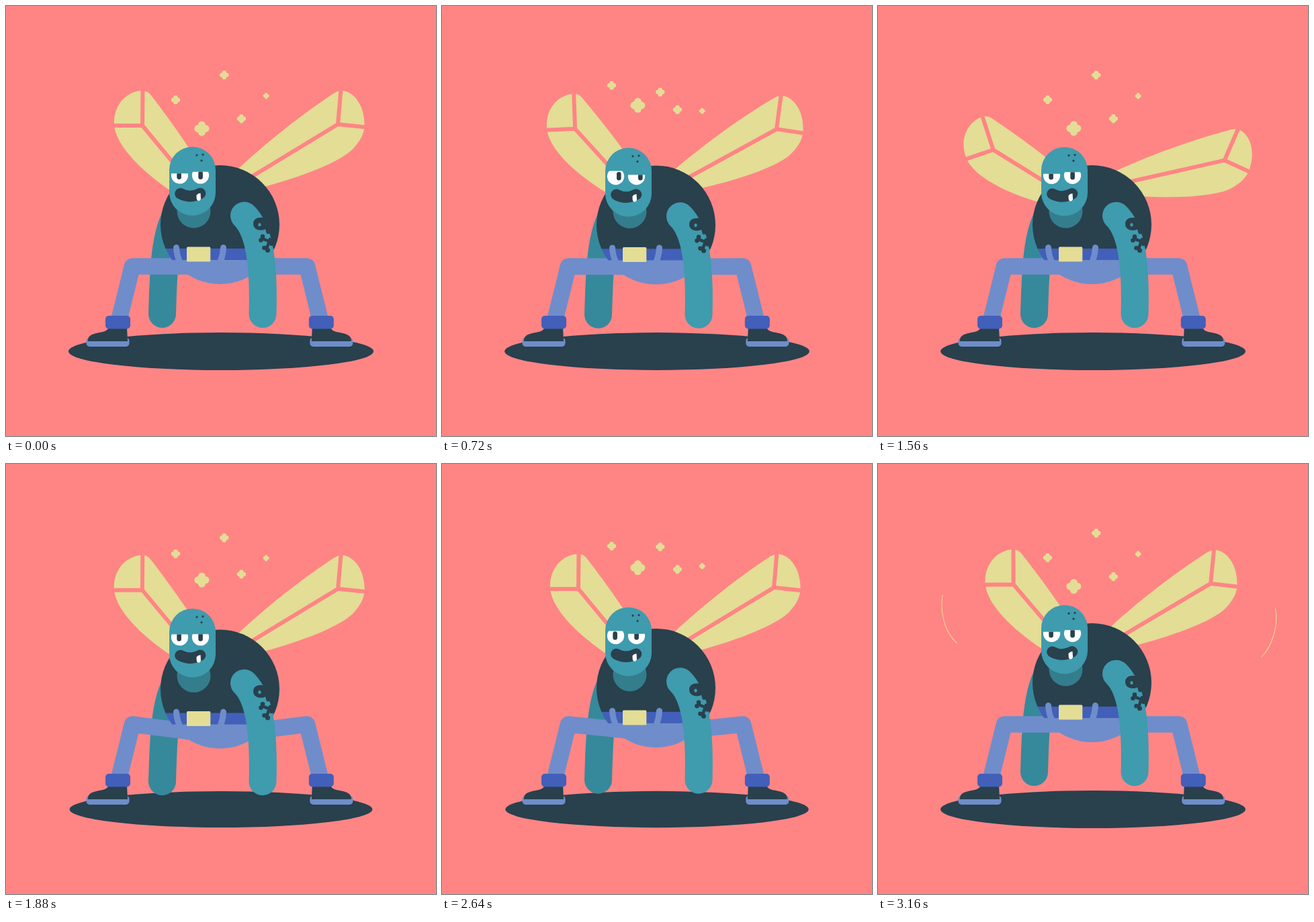
An HTML page that plays this animation: 640x640 px, repeating every 3200 ms.

```html
<!DOCTYPE html>
<html lang="en">
<head>
<meta charset="utf-8">
<title>Fly</title>
<style>
html, body { margin: 0; width: 100%; height: 100%; overflow: hidden; background: #ff8585; }
svg { display: block; width: 100vw; height: 100vh; }
.dark { fill: #29404d; }
.skin { fill: #3f9bae; }
.cloth { fill: #6f8dca; }
.denim { fill: #425fba; }
.pale { fill: #e3dd95; }
.line { fill: none; stroke-linecap: round; stroke-linejoin: round; }
.vein { fill: none; stroke: #ff8585; stroke-width: 6; }
.whoosh { fill: none; stroke: #e3dd95; }
</style>
</head>
<body>
<svg viewBox="0 0 640 640">
  <defs>
    <clipPath id="torso"><circle cx="318.5" cy="325.5" r="88.5"/></clipPath>
    <clipPath id="lidL"><rect id="lidLRect" x="240" width="37" height="40"/></clipPath>
    <clipPath id="lidR"><rect id="lidRRect" x="274" width="37" height="40"/></clipPath>
    <g id="puff">
      <circle cx=".5" r=".5"/><circle cx="-.5" r=".5"/>
      <circle cy=".5" r=".5"/><circle cy="-.5" r=".5"/>
    </g>
    <g id="foot">
      <rect class="cloth" x="119.5" y="493.5" width="64" height="13.5" rx="5"/>
      <path class="dark" d="M153 478H180L181 499H122C121 489 132 487.500 139 486C147 485 151 483 153 478Z"/>
      <rect class="denim" x="148" y="461" width="37" height="19.500" rx="5"/>
    </g>
  </defs>

  <ellipse id="shadow" class="dark" cx="320" cy="514"/>
  <g id="puffs" class="pale"></g>
  <path id="whooshL" class="whoosh" d="M105.500 195C101.500 220 108 250 127 266.500"/>
  <path id="whooshR" class="whoosh" d="M582 215C587 240 577 272 561.500 287"/>

  <g id="wings">
    <g id="wingL">
      <path class="pale" d="M300 252L270 208C250 178 232 154 216 133Q210 125 201 126C178 128 160 148 161 176C162 200 188 236 245 275L300 300Z"/>
      <path class="vein" d="M203.500 118L203 178L152 178M203 178L297.500 292"/>
    </g>
    <g id="wingR">
      <path class="pale" d="M330 262L345 243C400 192 450 155 488 130Q494 126 501 126C518 128 534 148 533.500 178C533 190 528 200 517 212C500 230 450 251 385 269L340 285Z"/>
      <path class="vein" d="M499 118L494 176L542 181M494 176L341 269"/>
    </g>
  </g>

  <path id="armL" class="line" stroke="#36899a" stroke-width="41" d="M255 310C236 335 234 400 232.500 458.500"/>
  <path id="legL" class="line" stroke="#6f8dca" stroke-width="24.500"/>
  <path id="legR" class="line" stroke="#6f8dca" stroke-width="24.500"/>
  <use href="#foot"/>
  <use href="#foot" transform="translate(635.800 0) scale(-1 1)"/>

  <g id="body">
    <g clip-path="url(#torso)">
      <rect class="dark" x="225" y="230" width="190" height="132"/>
      <rect class="denim" x="225" y="361" width="190" height="18"/>
      <rect class="cloth" x="225" y="378" width="190" height="40"/>
    </g>
    <g class="line" stroke="#6f8dca" stroke-width="9">
      <path d="M253.500 359.500Q254 370 258 379"/>
      <path d="M323.500 359.500Q323 370 319.500 379"/>
    </g>
    <rect class="pale" x="269" y="358.500" width="35.300" height="22" rx="1.500"/>
    <circle cx="279.500" cy="305.500" r="25" fill="#347d8d"/>
  </g>

  <g id="armR">
    <path class="line" stroke="#3f9bae" stroke-width="41" d="M354.500 312C378 335 384 385 382 458.500"/>
    <path class="dark" d="M368 324C368 317 375 314 382 315L394 322V339H388L386 332C382 335 368 335 368 324Z"/>
    <ellipse class="skin" cx="377.500" cy="325.500" rx="2.200" ry="2.600"/>
    <path class="line" stroke="#29404d" stroke-width="4.500" d="M381 346L396 352M393 347L388 361"/>
    <g class="dark">
      <circle cx="382" cy="343" r="3.300"/><circle cx="379.500" cy="348.500" r="3.300"/>
      <circle cx="384.500" cy="360" r="3.300"/><circle cx="389.500" cy="363.500" r="3.500"/>
      <circle cx="395" cy="354" r="3"/>
    </g>
  </g>

  <g id="head">
    <rect class="skin" x="243" y="209.500" width="69" height="102.500" rx="34.500"/>
    <g class="dark">
      <circle cx="284" cy="222" r="1.600"/><circle cx="293" cy="221.200" r="1.600"/><circle cx="291" cy="230" r="1.600"/>
    </g>
    <g clip-path="url(#lidL)">
      <circle cx="258.500" cy="252" r="12.600" fill="#fff"/>
      <rect class="dark pupil" x="254.300" y="245.500" width="6.600" height="12.500" rx="3.200"/>
    </g>
    <g clip-path="url(#lidR)">
      <circle cx="289.500" cy="252" r="12.600" fill="#fff"/>
      <rect class="dark pupil" x="286.300" y="245.500" width="6.600" height="12.500" rx="3.200"/>
    </g>
    <path class="line" stroke="#29404d" stroke-width="16.500" d="M259.500 279.300Q274 287 289 279"/>
    <path fill="#fff" d="M283.500 281.500Q286 278.500 289.500 278.500L290 287Q289 290 286.500 290Q284 289.500 283.700 287Z"/>
  </g>
</svg>
<script>
const LOOP = 3200, BOUNCE = 800, FLOAT = 1600;
const $ = id => document.getElementById(id);
const set = (el, attrs) => { for (const k in attrs) el.setAttribute(k, attrs[k]); };
const clamp = v => Math.min(1, Math.max(0, v));
const ramp = (t, a, b) => clamp((t - a) / (b - a));
const sine = p => (1 - Math.cos(Math.PI * p)) / 2;

// Ease with flat ends; x1 and x2 are the handle positions.
const ease = (x1, x2) => p => {
  let lo = 0, hi = 1;
  for (let i = 0; i < 24; i++) {
    const s = (lo + hi) / 2, r = 1 - s;
    if (3 * s * r * r * x1 + 3 * s * s * r * x2 + s ** 3 < p) lo = s; else hi = s;
  }
  return lo * lo * (3 - 2 * lo);
};

const dip = (t, peak, down, up) =>
  t < peak ? down(ramp(t, 0, peak)) : 1 - up(ramp(t, peak, BOUNCE));
const bodyRise = ease(.33, .33), armRise = ease(.33, .45), headFall = ease(.8, .67);

// x, y, radius, vertical travel
const puffs = [
  [252.5, 139.7, 6.6, -22], [291.4, 182.4, 11, -35.4], [324.8, 102.7, 6.6, 26],
  [350.4, 167.8, 6.6, -13.8], [387.2, 133.8, 4.6, 23]
].map(([x, y, r, travel]) => {
  const el = document.createElementNS('http://www.w3.org/2000/svg', 'use');
  el.setAttribute('href', '#puff');
  $('puffs').append(el);
  return { el, x, y, r, travel };
});

// time, fold amount
const flaps = [[0, 0], [320, 1], [640, 0], [980, 1], [1120, 1], [1380, 0],
  [1580, 1], [1870, 0], [2160, 1], [2640, 0], [2880, 1], [3200, 0]];
function fold(t) {
  const i = flaps.findIndex(k => k[0] > t);
  const [t0, a] = flaps[i - 1], [t1, b] = flaps[i];
  return a + (b - a) * sine(ramp(t, t0, t1));
}

const shift = (id, y) => set($(id), { transform: `translate(0 ${y})` });

function whoosh(t) {
  const p = t < 2000 ? ramp(t, 1080, 1480) : ramp(t, 2800, 3200);
  const dx = p * (1.35 - .35 * p) * 21 - 10.2;
  const width = 6.3 * Math.max(0, Math.sin(Math.PI * p)) ** 1.5;
  const display = p > 0 && p < 1 ? 'inline' : 'none';
  set($('whooshL'), { transform: `translate(${-dx} 0)`, 'stroke-width': width, display });
  set($('whooshR'), { transform: `translate(${dx} 0)`, 'stroke-width': width, display });
}

function draw(t) {
  const beat = t % BOUNCE, wave = t % FLOAT;
  const body = 12 * dip(beat, 400, sine, bodyRise);
  const arm = 17.8 * dip(beat, 400, sine, armRise);
  const drift = sine(2 * wave / FLOAT);
  const squash = sine(2 * beat / BOUNCE);

  set($('shadow'), { rx: 227 - 2 * squash, ry: 28 - 1.3 * squash });
  shift('body', body);
  shift('wings', body);
  shift('armL', arm);
  shift('armR', arm);
  shift('head', 13.7 * dip(beat, 440, headFall, sine));

  const hip = 387.5 + 1.1 * body;
  set($('legL'), { d: `M272 ${hip}L188 387.5L168.500 466` });
  set($('legR'), { d: `M364 ${hip}L448 387.5L467.500 466` });

  const angle = 19 * fold(t);
  set($('wingL'), { transform: `rotate(${-angle} 297.5 292)` });
  set($('wingR'), { transform: `rotate(${angle} 341 269)` });
  whoosh(t);

  set($('lidLRect'), { y: 249.3 - 5.5 * drift });
  set($('lidRRect'), { y: 246.8 + 3 * drift });
  const look = 5.7 * (sine(ramp(wave, 580, 710)) - sine(ramp(wave, 890, 1020)));
  document.querySelectorAll('.pupil').forEach(el => set(el, { transform: `translate(${look} 0)` }));

  for (const { el, x, y, r, travel } of puffs)
    set(el, { transform: `translate(${x} ${y + travel * drift}) scale(${r})` });
}

const start = performance.now();
function tick() {
  draw((performance.now() - start) % LOOP);
  requestAnimationFrame(tick);
}
draw(0);
requestAnimationFrame(tick);
</script>
</body>
</html>
```
